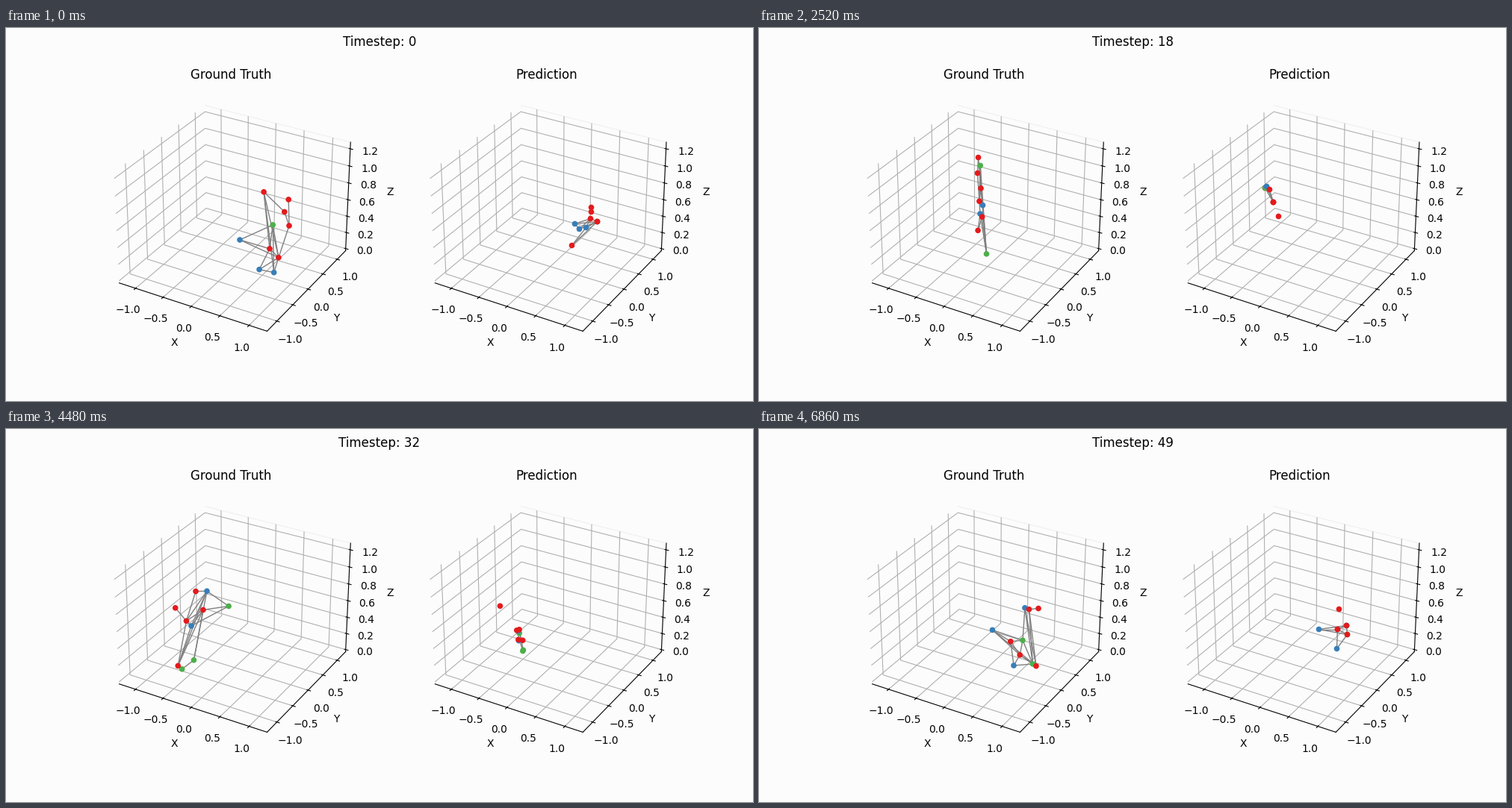
A matplotlib script for the animation above (7000 ms loop, 1000 by 500 pixels).

```python
import numpy as np
import matplotlib.pyplot as plt
from matplotlib.animation import FuncAnimation
from matplotlib.collections import LineCollection
from mpl_toolkits.mplot3d import proj3d

W, H, STEPS, INTERVAL = 1000, 500, 50, 140
BG = "#fcfcfc"
RED, BLUE, GREEN, BLACK = "#e41a1c", "#377eb8", "#4daf4a", "black"
HUES = {"R": RED, "B": BLUE, "G": GREEN}
REACH = 1.25
PAD = 1 / 48  # share of each axis range left free at both ends

# name: radius, start height, climb per step, hue of each life
NODES = {
    "C": (0.867, 0.803, 0.0091, "RG"),
    "E": (0.672, 0.613, 0.0181, "GG"),
    "F": (0.095, 0.320, 0.0455, "BGB"),
    "J": (0.445, 0.031, 0.0287, "BR"),
    "K": (0.704, 0.049, 0.0165, "BB"),
    "A": (0.509, 0.965, 0.0255, "RRB"),
    "B": (0.931, 0.957, 0.0057, "RR"),
    "D": (0.951, 0.658, 0.0051, "RR"),
    "H": (0.623, 0.320, 0.0203, "RR"),
    "I": (0.781, 0.246, 0.0125, "RR"),
}
NAMES = list(NODES)

# Screen spots of the predicted nodes; nodes sharing a key sit together
SPOTS = {
    0: {"F": (761, 262), "J": (767, 269), "K": (776, 267), "A": (757, 291),
        "B": (783, 240), "C": (783, 246), "D": (782, 255), "EHI": (791, 259)},
    6: {"F": (731, 238), "JK": (732, 240), "A": (733, 270), "B": (751, 204),
        "C": (736, 208), "DEHI": (761, 213)},
    18: {"JK": (679, 212), "CE": (677, 214), "D": (683, 216),
         "AFHI": (688, 233), "B": (695, 252)},
    28: {"D": (654, 219), "AFHIJK": (683, 261), "B": (695, 280),
         "CE": (694, 285)},
    36: {"D": (678, 256), "IK": (692, 276), "A": (697, 277),
         "BF": (696, 283), "CEHJ": (695, 300)},
    43: {"D": (731, 273), "K": (727, 283), "F": (732, 287), "CI": (746, 283),
         "B": (752, 283), "EJ": (739, 299), "AH": (741, 304)},
    49: {"D": (776, 241), "EIK": (786, 263), "HJ": (774, 268),
         "F": (749, 268), "BC": (787, 275), "A": (773, 294)},
}

TRUE_LINKS = {
    0: "AC AH AI AK BD CD DI EF EH EI EK FH FI HJ HI IJ IK JK",
    6: "AH AI AK BD CD DI EF EH EI EK FH FI HJ HK IJ IK JK",
    18: "CD CH EH EI DI HI HJ IJ IK AK AB BK FE FH FK FA FJ",
    28: "DI HJ HI IJ FJ JK IK AI AK AF FK BI BK AB BC CE AE EJ BJ",
    36: "AF FK AK AB AI DI BI BK EK EJ BE CE EH BJ CJ BH HJ",
    43: "DI IK CK BI HK FJ FH EJ HJ CE EH BH",
    49: "IK DI EK CK BI BK FE FH FB FJ HJ AJ EJ CE CH BH AH AC CI EH",
}
GUESS_LINKS = {
    0: "AI AK FI JI KI DI FD JD KD FJ",
    6: "AI FI JI KI FH JE",
    18: "CI KI DI",
    28: "IB IC AE",
    36: "IJ AJ BJ IA BA",
    43: "DK DH FJ KJ IJ IH JA BI FH",
    49: "FI FB FH HI HB HA AB IB",
}


def setup_axes(pos, title):
    ax = fig.add_subplot(1, 2, pos, projection="3d")
    ax.set_facecolor("none")
    side = REACH * (1 + 2 * PAD)
    ax.set(xlim=(-side, side), ylim=(-side, side),
           zlim=(-REACH * PAD, REACH * (1 + PAD)),
           xlabel="X", ylabel="Y", zlabel="Z", title=title)
    for axis in (ax.xaxis, ax.yaxis, ax.zaxis):
        axis.set_pane_color(BG)
    ax.yaxis.pane.set_edgecolor("#f2f2f2")
    return ax


def climb(t, start, rate, hues):
    """Height and colour of a node that restarts at the floor from height 1."""
    first = np.ceil((1 - start) / rate)
    if t < first:
        return start + rate * t, HUES[hues[0]]
    cycle = np.ceil(1 / rate) + 1
    life, age = divmod(t - first, cycle)
    color = HUES[hues[1 + int(life)]] if age else BLACK
    return rate * max(age - 1, 0), color


def true_state(t):
    """Screen points and colours of the spinning, climbing sheet."""
    angle = 2 * np.pi * t / STEPS
    r = np.array([node[0] for node in NODES.values()])
    z, colors = zip(*(climb(t, *node[1:]) for node in NODES.values()))
    x, y, _ = proj3d.proj_transform(r * np.cos(angle), r * np.sin(angle),
                                    np.array(z), true_ax.get_proj())
    pts = true_ax.transData.transform(np.column_stack([x, y]))
    pts = pts / fig.bbox.size * (W, H)
    pts[:, 1] = H - pts[:, 1]
    return pts, list(colors)


def locate(spots):
    return [next(p for key, p in spots.items() if n in key) for n in NAMES]


KEYS = np.array(list(SPOTS))
PLACES = np.array([locate(s) for s in SPOTS.values()]) + 0.5
SPEEDS = np.gradient(PLACES, KEYS, axis=0)


def guess_points(t):
    """Cubic Hermite path through the key places."""
    i = min(np.searchsorted(KEYS, t, side="right") - 1, len(KEYS) - 2)
    span = KEYS[i + 1] - KEYS[i]
    s = (t - KEYS[i]) / span
    ease = s * s * (3 - 2 * s)
    return (PLACES[i] * (1 - ease) + PLACES[i + 1] * ease
            + span * s * (1 - s) * ((1 - s) * SPEEDS[i] - s * SPEEDS[i + 1]))


def segments(pts, links, t):
    pairs = links[min(links, key=lambda k: abs(k - t))].split()
    return [(pts[NAMES.index(a)], pts[NAMES.index(b)]) for a, b in pairs]


fig = plt.figure(figsize=(W / 100, H / 100), dpi=100, facecolor=BG)
true_ax = setup_axes(1, "Ground Truth")
guess_ax = setup_axes(2, "Prediction")
heading = fig.suptitle("Timestep: 0")

# Nodes and links are laid over both plots in pixel coordinates
stage = fig.add_axes([0, 0, 1, 1])
stage.set(xlim=(0, W), ylim=(H, 0))
stage.axis("off")
edges = stage.add_collection(
    LineCollection([], colors="gray", linewidths=1, zorder=1))
dots = stage.scatter(np.zeros(2 * len(NAMES)), np.zeros(2 * len(NAMES)),
                     s=20, linewidths=1, zorder=2)
fig.canvas.draw()


def update(t):
    heading.set_text(f"Timestep: {t}")
    truth, colors = true_state(t)
    guess = guess_points(t)
    edges.set_segments(segments(truth, TRUE_LINKS, t)
                       + segments(guess, GUESS_LINKS, t))
    dots.set_offsets(np.vstack([truth, guess]))
    dots.set_facecolor(colors * 2)
    dots.set_edgecolor(colors * 2)
    return heading, edges, dots


anim = FuncAnimation(fig, update, frames=STEPS, interval=INTERVAL,
                     repeat=True, repeat_delay=0, blit=False)
plt.show()
```
